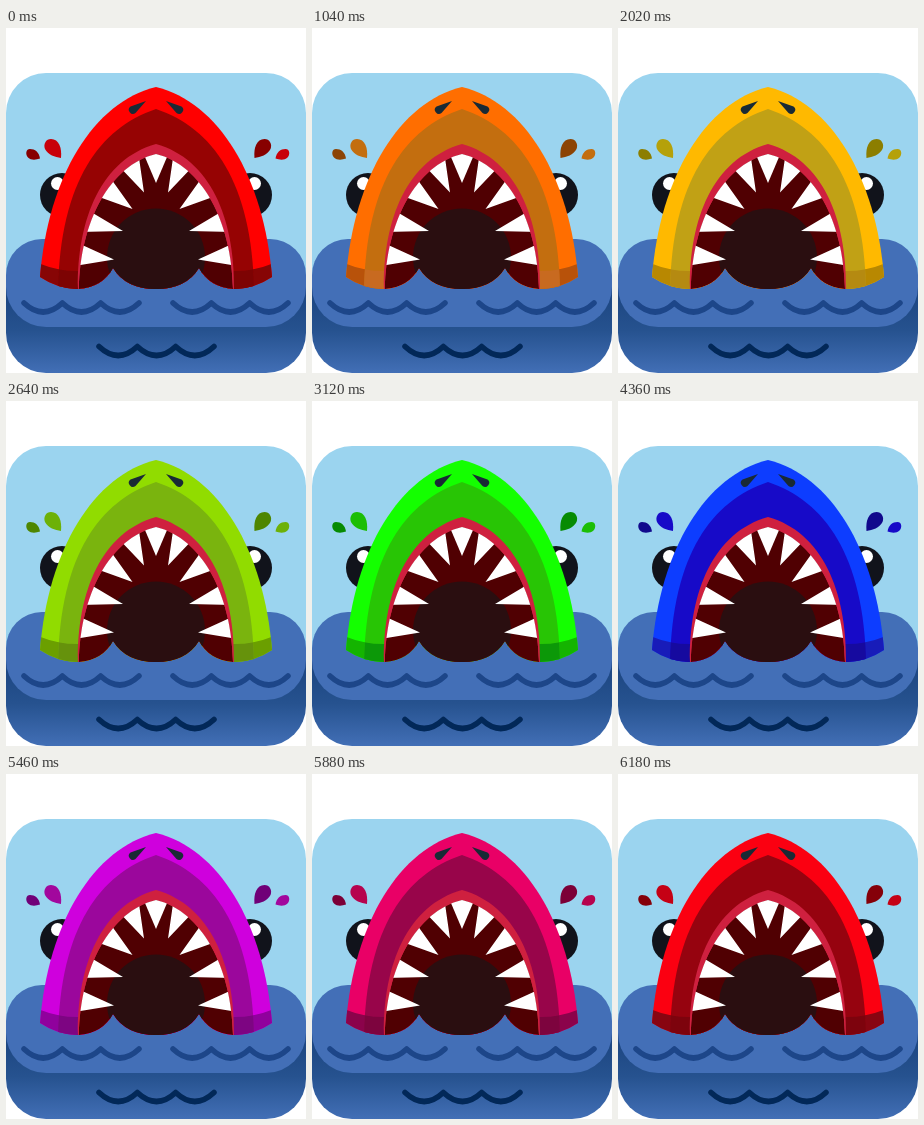
These frames come from a looping animation (300x345 px, 6240 ms). An HTML page with a canvas:

```html
<!DOCTYPE html>
<html lang="en">
<head>
<meta charset="utf-8">
<title>Colour-changing shark</title>
<style>
html, body { margin: 0; width: 100%; height: 100%; overflow: hidden; background: #fff; }
canvas { display: block; width: 300px; height: 345px; }
</style>
</head>
<body>
<canvas id="stage"></canvas>
<script>
const canvas = document.getElementById('stage');
const ctx = canvas.getContext('2d');
const ratio = window.devicePixelRatio || 1;
canvas.width = 300 * ratio;
canvas.height = 345 * ratio;
ctx.scale(ratio, ratio);

const PHASE = 1040, HOLD = 200, STEP = 60, STEPS = 15;

// Each part runs through red, orange, amber, green, blue, purple.
const shades = {
  skin: ['ff0000', 'ff6e00', 'ffbe00', '14ff00', '0041ff', 'c800ff'],
  inner: ['960303', 'c36e0f', 'c1a515', '28c505', '0d0ac9', '9c08b4'],
  wetSkin: ['870505', 'b8520a', 'b88c00', '14b400', '0f1eb9', '9100b4'],
  wetInner: ['7d0303', 'c86a20', 'b48c10', '0c9808', '0f0aa0', '7d0596'],
  dropDark: ['870000', '8c4405', '8c8200', '078b02', '0a0a8c', '6c008a'],
  dropLight: ['c8000a', 'c36e0f', 'b4a50a', '1cbe05', '0d0ac9', '9c08b4']
};

function mix(a, b, f) {
  const part = (c, i) => parseInt(c.slice(i, i + 2), 16);
  const rgb = [0, 2, 4].map(i => Math.round(part(a, i) + (part(b, i) - part(a, i)) * f));
  return `rgb(${rgb})`;
}

function colorsAt(ms) {
  const time = ms % (PHASE * 6);
  const key = Math.floor(time / PHASE);
  const local = time % PHASE;
  const step = local < HOLD ? 0 : 1 + Math.floor((local - HOLD) / STEP);
  const out = {};
  for (const name in shades) {
    const list = shades[name];
    out[name] = mix(list[key], list[(key + 1) % 6], step / STEPS);
  }
  return out;
}

function fill(path, color) {
  ctx.fillStyle = color;
  ctx.fill(path);
}

function dot(x, y, r, color) {
  const p = new Path2D();
  p.arc(x, y, r, 0, Math.PI * 2);
  fill(p, color);
}

function rounded(x, y, w, h, r) {
  const p = new Path2D();
  p.roundRect(x, y, w, h, r);
  return p;
}

// Symmetric arch from its left foot over the top to the right foot, closed by base.
function arch(top, ax, ay, bx, by, x, y, base) {
  return new Path2D(`M${x} ${y}C${bx} ${by} ${ax} ${ay} 150 ${top}` +
    `C${300 - ax} ${ay} ${300 - bx} ${by} ${300 - x} ${y}${base}Z`);
}

const card = rounded(0, 45, 300, 300, 40);
const water = rounded(0, 211, 300, 88, [36, 36, 40, 40]);
const jaw = 'Q248 261 228 261L72 261Q52 261 34 249';
const head = arch(59, 88, 74, 42, 148, 34, 249, jaw);
const stripe = arch(81, 93, 100, 54, 155, 52, 262, '');
const mouthBase = 'Q203 259 193 240Q180 261 150 261Q120 261 107 240Q97 259 ';
const gums = arch(116, 96, 131, 71, 190, 72, 261, mouthBase + '72 261');
const mouth = arch(126, 104, 137, 74, 194, 73, 261, mouthBase + '73 261');
const wet = new Path2D('M30 234Q49 243 72 243L228 243Q251 243 270 234V270H30Z');
const nostril = new Path2D('M140 73L124.5 78.5A4 4 0 1 0 129.5 85Z');
const teeth = new Path2D('M108 133L132 123L138 164.5Z M82 165L98 141L126.5 181Z' +
  'M80 181L70 204L117 203Z M74 216L68 238L108 231.5Z');
const midTooth = new Path2D('M136 122L164 122L150 155Z');
const drop = new Path2D('M55 130C56 120 53 111 45 111C40 111 37 116 39 121C42 127 49 129 55 130Z');
const smallDrop = new Path2D('M34 130.5C33 124 29 121 24 121C20 121 19 126 22 129.5C25 132.5 30 132 34 130.5Z');

function wave(x, y, color) {
  const w = 115 / 3;
  ctx.beginPath();
  ctx.moveTo(x, y);
  for (let i = 0; i < 3; i++) {
    ctx.quadraticCurveTo(x + (i + 0.5) * w, y + 18, x + (i + 1) * w, y);
  }
  ctx.lineWidth = 5.5;
  ctx.lineCap = ctx.lineJoin = 'round';
  ctx.strokeStyle = color;
  ctx.stroke();
}

function bothSides(paint) {
  paint(false);
  ctx.save();
  ctx.translate(300, 0);
  ctx.scale(-1, 1);
  paint(true);
  ctx.restore();
}

function drawScene() {
  const deep = ctx.createLinearGradient(0, 260, 0, 345);
  deep.addColorStop(0, '#1b447f');
  deep.addColorStop(0.5, '#26528f');
  deep.addColorStop(1, '#426fb6');
  ctx.fillStyle = '#9bd4ef';
  ctx.fillRect(0, 45, 300, 210);
  ctx.fillStyle = deep;
  ctx.fillRect(0, 255, 300, 90);
  fill(water, '#436fb7');
  wave(18, 275, '#1d4689');
  wave(167, 275, '#1d4689');
  wave(93, 318.5, '#022858');
}

function drawMouth() {
  fill(gums, '#cf203f');
  ctx.save();
  ctx.clip(mouth);
  fill(mouth, '#500002');
  dot(150, 229.5, 49, '#2a0e10');
  bothSides(() => fill(teeth, '#fff'));
  fill(midTooth, '#fff');
  ctx.restore();
}

function drawShark(c) {
  bothSides(() => {
    dot(56, 167, 22, '#11131b');
    dot(51.5, 155.5, 6.5, '#fff');
  });
  ctx.save();
  // Leave the water visible in the notches below the mouth.
  const body = new Path2D('M0 0H300V270H228V261' + mouthBase + '72 261V270H0Z');
  ctx.clip(body);
  fill(head, c.skin);
  ctx.clip(head);
  fill(wet, c.wetSkin);
  fill(stripe, c.inner);
  ctx.clip(stripe);
  fill(wet, c.wetInner);
  ctx.restore();
  drawMouth();
  bothSides(right => {
    fill(nostril, '#192a35');
    // The right-hand splash sits a little further out.
    if (right) ctx.translate(-3.5, 0);
    fill(drop, right ? c.dropDark : c.dropLight);
    fill(smallDrop, right ? c.dropLight : c.dropDark);
  });
}

function draw(ms) {
  ctx.clearRect(0, 0, 300, 345);
  ctx.save();
  ctx.clip(card);
  drawScene();
  drawShark(colorsAt(ms));
  ctx.restore();
}

const start = performance.now();
function tick() {
  draw(Math.max(0, performance.now() - start));
  requestAnimationFrame(tick);
}
tick();
</script>
</body>
</html>
```
